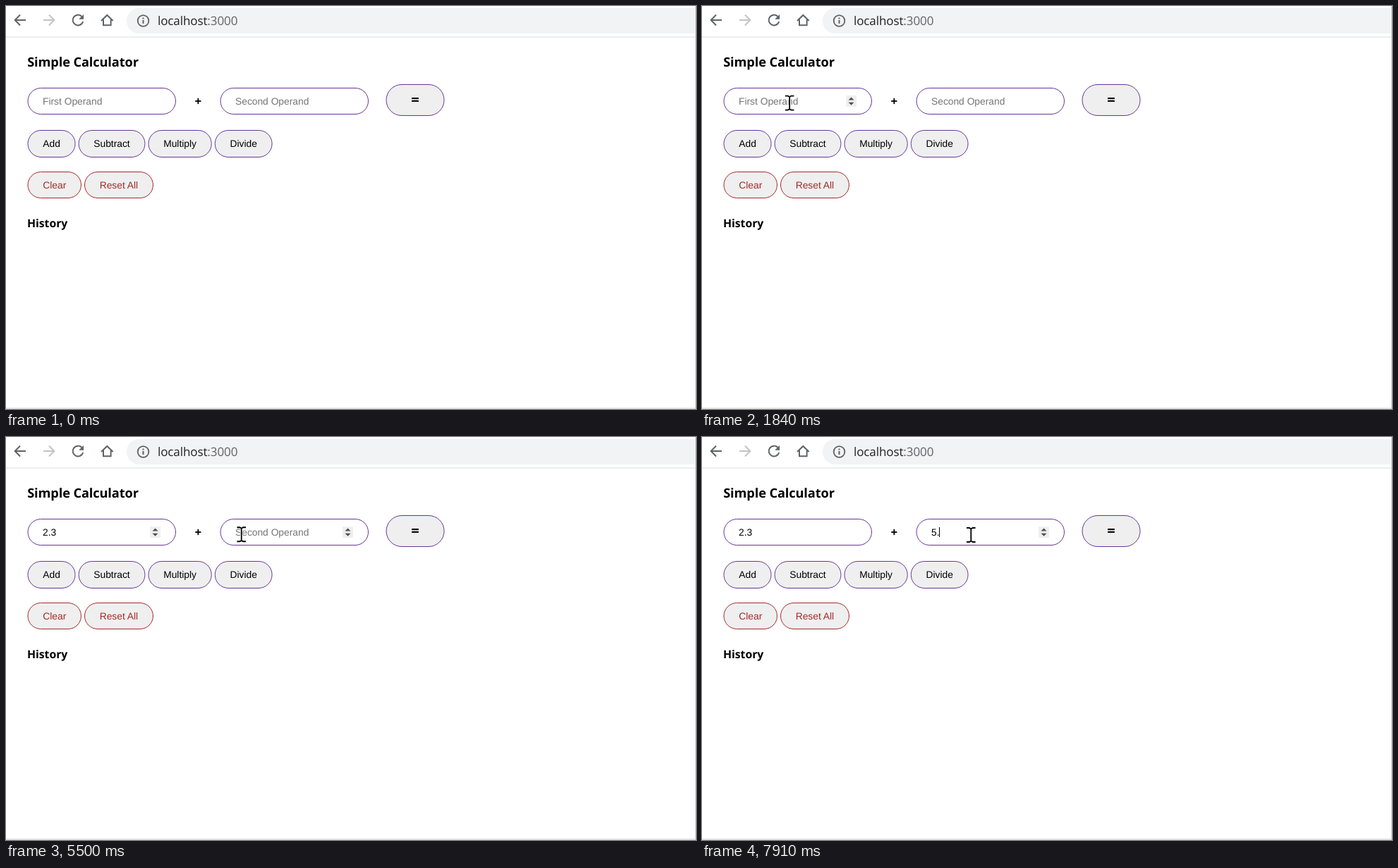
These frames come from a looping animation (978 by 572 pixels, 8 s). An HTML page:

```html
<!DOCTYPE html>
<html lang="en">
<head>
<meta charset="utf-8">
<title>Simple Calculator</title>
<style>
  html, body { margin: 0; width: 100%; height: 100%; overflow: hidden; background: #fff; }
  svg { display: block; width: 978px; height: 572px; }
  text { font: 13.8px "Liberation Sans", Arial, sans-serif; text-rendering: geometricPrecision; }
  .ui { font-family: "Open Sans", "Noto Sans", sans-serif; }
  .bold { font-weight: 700; }
  .title { font-size: 18.2px; letter-spacing: -.1px; }
  .sub { font-size: 15.8px; letter-spacing: -.05px; }
  .url { font-size: 17px; letter-spacing: -.1px; fill: #202124; }
  .mid { text-anchor: middle; }
  .icon { fill: none; stroke: #5f6368; stroke-width: 2; }
  .field { fill: #fff; stroke: #639; }
  .btn rect { fill: #efefef; stroke: #639; }
  .btn.hover rect { fill: #639; }
  .warn rect { stroke: #a52a2a; }
  .warn text { fill: #a52a2a; }
  .warn.hover rect { fill: #a52a2a; }
  .btn.hover text { fill: #fff; }
  .empty { fill: #757575; }
</style>
</head>
<body>
<svg viewBox="0 0 978 572">
  <defs>
    <g id="spin">
      <rect x="-7.5" y="-8" width="15" height="16" fill="#efefef"/>
      <path d="M-4 -1.6L0 -5.6L4 -1.6ZM-4 1.8L0 5.8L4 1.8Z" fill="#505050"/>
    </g>
    <path id="bar" d="M-6 -10H-2L.3 -8.6L2.6 -10H6.6M.3 -9V9M-6 10H-2L.3 8.6L2.6 10H6.6"/>
  </defs>

  <!-- browser bar -->
  <path d="M978 3H189a18 18 0 0 0 0 36H978Z" fill="#f1f3f4"/>
  <path d="M0 44H978" stroke="#dadce0"/>
  <g class="icon">
    <path d="M28 20H13M20 12.5L12.7 20L20 27.5"/>
    <path d="M53 20H68M61 12.5L68.3 20L61 27.5" stroke="#c2c4c6"/>
    <path d="M107.5 15A7.4 7.4 0 1 0 109.2 22"/>
    <path d="M110 12V18.8H103.2Z" fill="#5f6368" stroke="none"/>
    <path d="M135 21L143.3 13L151.6 21M138 19V27.3H148.6V19"/>
    <circle cx="194.5" cy="21" r="7.8" stroke-width="1.8"/>
    <path d="M194.5 20V25M194.5 16.6V18.6"/>
  </g>
  <text class="ui url" x="215" y="27">localhost<tspan fill="#5f6368">:3000</tspan></text>

  <!-- page -->
  <text class="ui bold title" x="30.2" y="86">Simple Calculator</text>
  <g id="fields"></g>
  <text class="ui bold mid" x="272.3" y="141" style="font-size:17px">+</text>
  <g class="btn"><rect x="539" y="111.5" width="82" height="44" rx="22"/></g>
  <text class="ui bold mid" x="580" y="140" style="font-size:20px">=</text>
  <g id="buttons"></g>
  <text class="ui bold sub" x="30" y="313.5">History</text>
  <path d="M977.5 0V572M0 571H978" stroke="#c4c4c4"/>
  <rect id="caret" y="128" width="1" height="14"/>

  <!-- pointer -->
  <g id="cursor">
    <circle id="click" cx="-2.5" cy="-1" r="15.5" fill="#ff0" fill-opacity=".47"/>
    <path id="arrow" d="M.5 .5V20L4.8 16L7.8 22.7L10.6 21.4L7.7 15H14Z" fill="#fff" stroke="#000"/>
    <path id="hand" transform="scale(.93)" fill="#fff" stroke="#000" stroke-width="1.2" stroke-linejoin="round"
      d="M-1.8 2C-1.8 -1.2 2.2 -1.2 2.2 2V9.5c.5 -2 3.6 -1.8 4 .6c1 -1.6 3.6 -1 3.8 1c1 -1.2 3 -.4 3 1.6V19c0 2 -1.4 3.5 -1.8 5V26.5H-.8V24.5C-3 21 -5.5 17.5 -6.8 15c-1 -2 .8 -3.4 2.6 -2l2.4 2.6Z"/>
    <g id="beam" fill="none">
      <use href="#bar" stroke="#fff" stroke-width="3.4"/>
      <use href="#bar" stroke="#000" stroke-width="1.8"/>
    </g>
  </g>
</svg>
<script>
const LOOP = 8000, BLINK = 530;
const $ = id => document.getElementById(id);

function add(parent, tag, attrs, text = "") {
  const el = document.createElementNS("http://www.w3.org/2000/svg", tag);
  for (const name in attrs) el.setAttribute(name, attrs[name]);
  el.textContent = text;
  return parent.appendChild(el);
}
const show = (el, on) => el.setAttribute("visibility", on ? "visible" : "hidden");

// Each button is as wide as its label plus padding.
function buttonRow(labels, y, height, cls) {
  let x = 31;
  return labels.map(label => {
    const group = add($("buttons"), "g", { class: cls });
    const rect = add(group, "rect", { x, y, height, rx: height / 2 });
    const text = add(group, "text", { class: "mid", y: y + height / 2 + 4.8 }, label);
    const width = text.getComputedTextLength() + 42.5;
    rect.setAttribute("width", width);
    text.setAttribute("x", x + width / 2);
    const box = { group, x, y, width, height };
    x += width + 5;
    return box;
  });
}

function makeField(x, hint) {
  const box = { x, y: 116.5, width: 209.5, height: 37 };
  add($("fields"), "rect", { ...box, rx: 18.5, class: "field" });
  const text = add($("fields"), "text", { x: x + 21, y: 140 });
  const spin = add($("fields"), "use", { href: "#spin", x: x + 180.5, y: 135 });
  return { ...box, hint, text, spin };
}

const buttons = [
  ...buttonRow(["Add", "Subtract", "Multiply", "Divide"], 176.5, 38, "btn"),
  ...buttonRow(["Clear", "Reset All"], 235.5, 37, "btn warn")
];
const fields = [makeField(31, "First Operand"), makeField(304, "Second Operand")];

const glides = [
  { start: 370, step: 75, steps: 3, to: [319, 417] },
  { start: 830, step: 76, steps: 6, to: [167, 200] },
  { start: 1290, step: 78, steps: 10, to: [122, 135] },
  { start: 5250, step: 78, steps: 7, to: [381, 139] }
];
const edits = [
  { time: 2160, field: 0, value: "", hold: 230 },
  { time: 3630, field: 0, value: "2" },
  { time: 4240, field: 0, value: "2." },
  { time: 4560, field: 0, value: "2.3" },
  { time: 5820, field: 1, value: "", hold: 70 },
  { time: 7360, field: 1, value: "5" },
  { time: 7910, field: 1, value: "5." }
];

// The pointer decelerates along each glide, in visible steps.
function pointerAt(t) {
  let pos = [884, 730];
  for (const { start, step, steps, to } of glides) {
    if (t < start) break;
    const p = Math.min(1, (Math.floor((t - start) / step) + 1) / steps);
    const ease = 1 - (1 - p) ** 2;
    pos = pos.map((from, i) => from + (to[i] - from) * ease);
  }
  return pos;
}

const inside = (b, x, y) => x > b.x && x < b.x + b.width && y > b.y && y < b.y + b.height;
const inputRow = { x: 31, y: 116.5, width: 482.5, height: 37 };

function draw(t) {
  const [x, y] = pointerAt(t);
  const target = buttons.find(b => inside(b, x, y));
  const kind = target ? "hand" : inside(inputRow, x, y) ? "beam" : "arrow";
  $("cursor").setAttribute("transform", `translate(${x} ${y})`);
  for (const id of ["arrow", "hand", "beam"]) show($(id), id === kind);
  for (const b of buttons) b.group.classList.toggle("hover", b === target);

  const done = edits.filter(e => e.time <= t);
  const last = done.at(-1);
  show($("click"), last && t - last.time < (last.hold || 0));

  fields.forEach((f, i) => {
    const value = done.findLast(e => e.field === i)?.value;
    f.text.textContent = value || f.hint;
    f.text.classList.toggle("empty", !value);
    show(f.spin, last?.field === i || inside(f, x, y));
  });

  show($("caret"), last && Math.floor((t - last.time) / BLINK) % 2 === 0);
  if (last) {
    const { x: left, text } = fields[last.field];
    const width = last.value ? text.getComputedTextLength() : 0;
    $("caret").setAttribute("x", Math.floor(left + 21 + width * .97));
  }
}

const start = performance.now();
function tick() {
  draw((performance.now() - start) % LOOP);
  requestAnimationFrame(tick);
}
tick();
</script>
</body>
</html>
```
